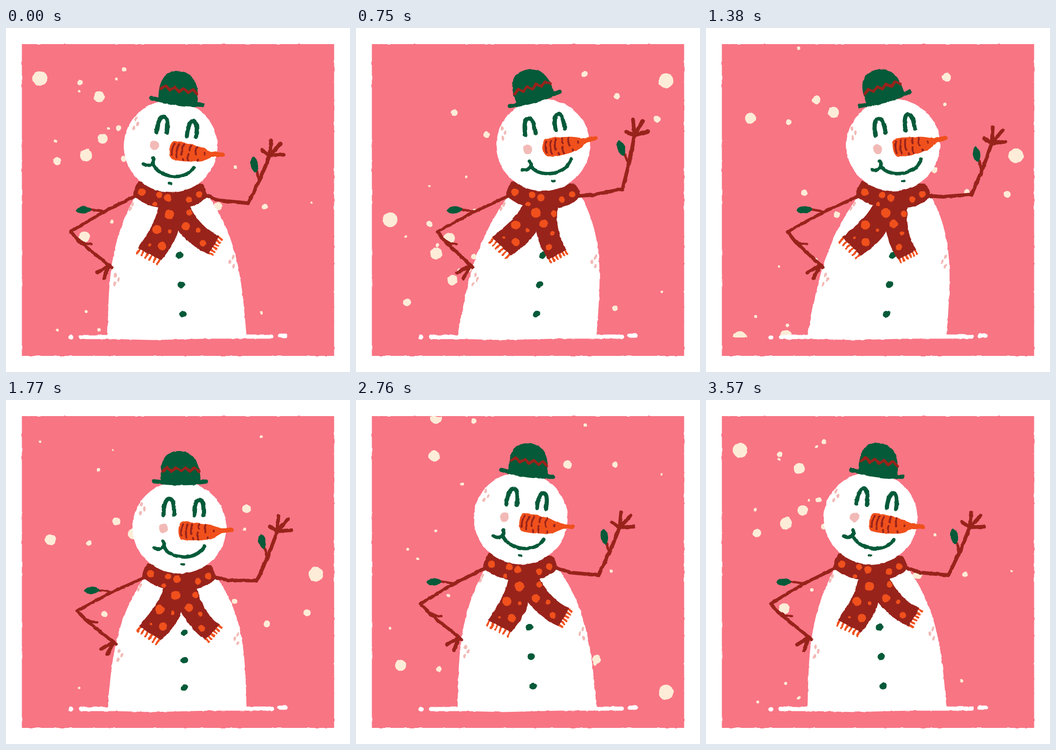
Animation of 748x748 px, one loop 3.6 s. Source, as an HTML page with a canvas:

```html
<!DOCTYPE html>
<html lang="en">
<head>
<meta charset="utf-8">
<title>Waving snowman</title>
<style>
  html, body { margin: 0; width: 100%; height: 100%; overflow: hidden; background: #fff; }
  svg, canvas { position: absolute; left: 0; top: 0; width: 748px; height: 748px; }
  canvas { filter: url(#boil); }
</style>
</head>
<body>
<svg viewBox="0 0 748 748">
  <filter id="paper" x="-5%" y="-5%" width="110%" height="110%" color-interpolation-filters="sRGB">
    <feTurbulence type="fractalNoise" baseFrequency=".06" numOctaves="2" seed="4"/>
    <feDisplacementMap in="SourceGraphic" scale="3" xChannelSelector="R" yChannelSelector="G"/>
  </filter>
  <filter id="boil" x="0" y="0" width="100%" height="100%" color-interpolation-filters="sRGB">
    <feTurbulence id="noise" type="fractalNoise" baseFrequency=".08" numOctaves="2" seed="1"/>
    <feDisplacementMap in="SourceGraphic" scale="4" xChannelSelector="R" yChannelSelector="G"/>
  </filter>
  <rect x="34.5" y="35" width="679" height="678" fill="#f87584" filter="url(#paper)"/>
</svg>
<canvas id="stage" width="748" height="748"></canvas>
<script>
const LOOP = 3600, BASE = 668, HEIGHT = 303, SHIFT = 50;
const GREEN = '#045a39', RED = '#98231b', ORANGE = '#f0501c', BLUSH = '#f2bab6', SNOW = '#fdecd7';
const ctx = document.getElementById('stage').getContext('2d');
const noise = document.getElementById('noise');
const { PI, sin, cos, floor, min, max, hypot } = Math;
const rad = deg => deg * PI / 180;

let seed = 7;
const random = () => (seed = seed * 16807 % 2147483647) / 2147483647;

// Large flakes are placed [x, y, radius] at time 0; tiny ones are scattered among them
const layers = [
  { v: .41, span: 1464, tiny: 5, flakes: [[74,109,16],[160,118,6],[203,149,12],[257,90,5],[245,217,6],
    [210,240,11],[111,289,9],[170,454,12]] },
  { v: .284, tiny: 3, flakes: [[174,277,13],[256,284,6]] },
  { v: .295, tiny: 3, flakes: [[563,388,6],[460,388,9.5]] },
  { v: .276, tiny: 4, flakes: [[97,-185,12],[180,-177,6],[240,-225,9],[277,-198,12],[214,-23,7],[284,25,7]] },
  { v: .259, tiny: 1, flakes: [[655,4,7.5],[674,-80,16]] },
  { v: .331, tiny: 0, flakes: [[523,-350,9.5],[497,-148,6],[567,-100,7],[394,-64,6.5],[464,-15,6.5],[361,-636,7]] }
];
for (const { flakes, tiny } of layers) {
  const xs = flakes.map(f => f[0]), left = min(...xs), right = max(...xs);
  for (let i = 0; i < tiny; i++) {
    flakes.push([left + (right - left) * random(), 900 * random(), 2.2 + 1.8 * random()]);
  }
}

let lean = 0, dip = 0;

function group(x, y, deg, paint) {
  ctx.save();
  ctx.translate(x, y);
  ctx.rotate(rad(deg));
  paint();
  ctx.restore();
}

function disc(color, x, y, rx, ry = rx, turn = 0) {
  ctx.fillStyle = color;
  ctx.beginPath();
  ctx.ellipse(x, y, rx, ry, rad(turn), 0, 2 * PI);
  ctx.fill();
}

function fill(color, d) {
  ctx.fillStyle = color;
  ctx.fill(new Path2D(d));
}

function stroke(color, width, d) {
  ctx.strokeStyle = color;
  ctx.lineWidth = width;
  ctx.stroke(new Path2D(d));
}

function specks(x, y, side) {
  for (const [dx, dy] of [[0, -10], [6, 0], [-2, 10]]) disc(BLUSH, x + dx * side, y + dy, 2.8, 5.2, 12);
}

function leaf(x, y, turn) {
  group(x, y, turn, () => fill(GREEN, 'M-17 0C-11 -11 8 -11 17 -2C15 8 -11 12 -17 0Z'));
}

function snow(t) {
  ctx.save();
  ctx.beginPath();
  ctx.rect(35, 36, 679, 637);
  ctx.clip();
  for (const { v, span = v * LOOP, flakes } of layers) {
    for (const [x, y, r] of flakes) {
      const fallen = (y - 15 + v * t) % span;
      disc(SNOW, x, 15 + (fallen + span) % span, r);
    }
  }
  ctx.restore();
}

function ground() {
  stroke('#fff', 9, 'M163 672H240L320 674L440 671H578M595 669H608');
  disc('#fff', 141, 672.5, 5.5, 5);
}

// The torso and both upper arms shear sideways and squash towards the ground
function torso(swing) {
  const k = SHIFT * lean / HEIGHT, q = dip / HEIGHT;
  ctx.save();
  ctx.transform(1, 0, -k, 1 - q, k * BASE, q * BASE);
  fill('#fff', 'M221 674V668C224 560 222 470 283 362H437C500 450 512 530 523 668V674Z');
  specks(238, 547, 1);
  specks(493, 508, -1);
  disc(BLUSH, 275, 383, 2.8, 5, 12);
  disc(BLUSH, 270, 393, 2.8, 5, 12);
  for (let i = 0; i < 3; i++) disc(GREEN, 377 + 4 * i, 494 + 64 * i, 8, 7.2, -20);

  stroke(RED, 7, 'M280 366L212 400L140 443L161 465L224 516L230 521');
  stroke(RED, 5, 'M212 399L181 394M158 461L173 469L186 470');
  stroke(RED, 8, 'M224 516L198 532M224 516L213 544');
  leaf(169, 396, 0);

  const elbow = [527, 381 - lean * (19 + 12 * swing)];
  stroke(RED, 8, `M437 365L465 ${375 - lean * (8 + 4 * swing)}L${elbow}`);
  ctx.restore();

  const h = (BASE - elbow[1]) / HEIGHT;
  group(elbow[0] + SHIFT * lean * h, elbow[1] + dip * h, 25 - lean * (2.5 + 9 * swing), () => {
    ctx.scale(1, 1 + .05 * lean);
    stroke(RED, 8, 'M0 0L1 -60L-2 -114L-21 -117M-2 -114L-13 -145M-2 -114L9 -147M-2 -114L25 -128');
    stroke(RED, 6, 'M0 -54L-12 -70');
    leaf(-24, -81, 58);
  });
}

function cloth(d, dots) {
  fill(RED, d);
  stroke(RED, 3, d);
  ctx.save();
  ctx.clip(new Path2D(d));
  for (const [x, y, r] of dots) disc(ORANGE, x, y, r);
  ctx.restore();
}

function fringe([x, y], [dx, dy], length) {
  const reach = length / hypot(dx, dy);
  for (let k = .04; k < 1; k += .184) {
    stroke(ORANGE, 4.5, `M${x + dx * k} ${y + dy * k}l${-dy * reach} ${dx * reach}`);
  }
}

function scarf() {
  group(370 + SHIFT * lean, 380 + dip, 0, () => {
    group(-16 * lean, 5 * lean, 17 * lean, () => {
      fringe([-81, 98], [48, 25], 13);
      cloth('M-36 0C-40 35 -55 60 -81 98L-33 123C-14 100 2 75 4 54L26 0Z',
        [[-42,58,10],[-31,94,9],[-58,92,3],[-14,62,4]]);
    });
    group(-3 * lean, -9 * lean, 32 * lean, () => {
      fringe([70, 110], [22, -37], 10);
      cloth('M-25 0L2 55C20 78 42 98 70 110L92 73C70 65 42 40 24 0Z',
        [[21,51,9],[29,21,7],[48,59,5],[58,88,7]]);
    });
    cloth('M-81 -45Q-92 -28 -92 -16Q-65 6 -35 9H20Q50 4 66 -14Q64 -32 55 -40Z',
      [[-75,-23,8],[-37,-17,7],[-18,-11,8],[28,-7,7],[50,-18,7],[-46,3,5]]);
    disc(ORANGE, -15 - 14 * lean, 25 - 3 * lean, 10.5);
  });
}

function nose() {
  fill(ORANGE, 'M4 -12C18 -15 38 -11 56 -9C72 -8 80 -2 90 -1L115 -2C121 0 121 6 115 7L94 10C84 15 76 24 62 25C42 28 22 30 6 27C-4 22 -4 -6 4 -12Z');
  stroke(RED, 4, 'M8 -7Q2 4 5 18M18 -7Q12 8 16 22M28 -8Q24 4 26 14M30 22L31 26M43 -8Q40 -2 43 3M41 11Q39 18 42 25M57 -7Q53 2 57 10M62 20V23M75 4V7');
}

function hat() {
  group(-3 * lean, -99 - 3 * lean, -7 * lean * lean, () => {
    fill(GREEN, 'M-40 4C-46 -46 -32 -66 -2 -66C30 -66 46 -40 45 4Z');
    stroke(GREEN, 9, 'M-56 0Q0 8 57 0');
    stroke(RED, 6, 'M-38 -22' + 'l10 -8l10 8'.repeat(4));
  });
}

function head() {
  group(358 + 49 * lean, 257.5 - 3 * lean + dip, 7.7 - 16.7 * lean, () => {
    disc('#fff', 0, 0, 102, 100);
    specks(-83, -39, 1);
    disc(BLUSH, -35, 2 + 2 * lean, 10, 10.5);
    stroke(GREEN, 9, 'M-35 -27C-35 -48 -31 -62 -23 -62C-14 -62 -12 -44 -12 -28');
    stroke(GREEN, 9, 'M32 -27C31 -47 35 -61 42 -61C51 -61 52 -44 52 -28');
    stroke(GREEN, 7.5, 'M-35 30Q-29 38 -36 44Q-43 50 -53 46M-34 41C-26 56 -10 64 14 64C34 63 50 52 56 39');
    stroke(GREEN, 5, 'M7 80H12');
    nose();
    hat();
  });
}

function hop(t, start) {
  const u = min(1, max(0, (t - start) / 390));
  return { move: u < .5 ? 4 * u ** 3 : 1 - 4 * (1 - u) ** 3, dip: 21 * sin(PI * u) };
}

function draw(now) {
  const t = now % LOOP, over = hop(t, 90), back = hop(t, 1560);
  lean = over.move - back.move;
  dip = over.dip + back.dip;
  noise.setAttribute('seed', 1 + floor(t / 120) % 8);

  ctx.clearRect(0, 0, 748, 748);
  ctx.lineCap = ctx.lineJoin = 'round';
  snow(t);
  ground();
  torso(cos(2 * PI * (t - 750) / 840));
  scarf();
  head();
}

const start = performance.now();
function tick() {
  draw(performance.now() - start);
  requestAnimationFrame(tick);
}
tick();
</script>
</body>
</html>
```
